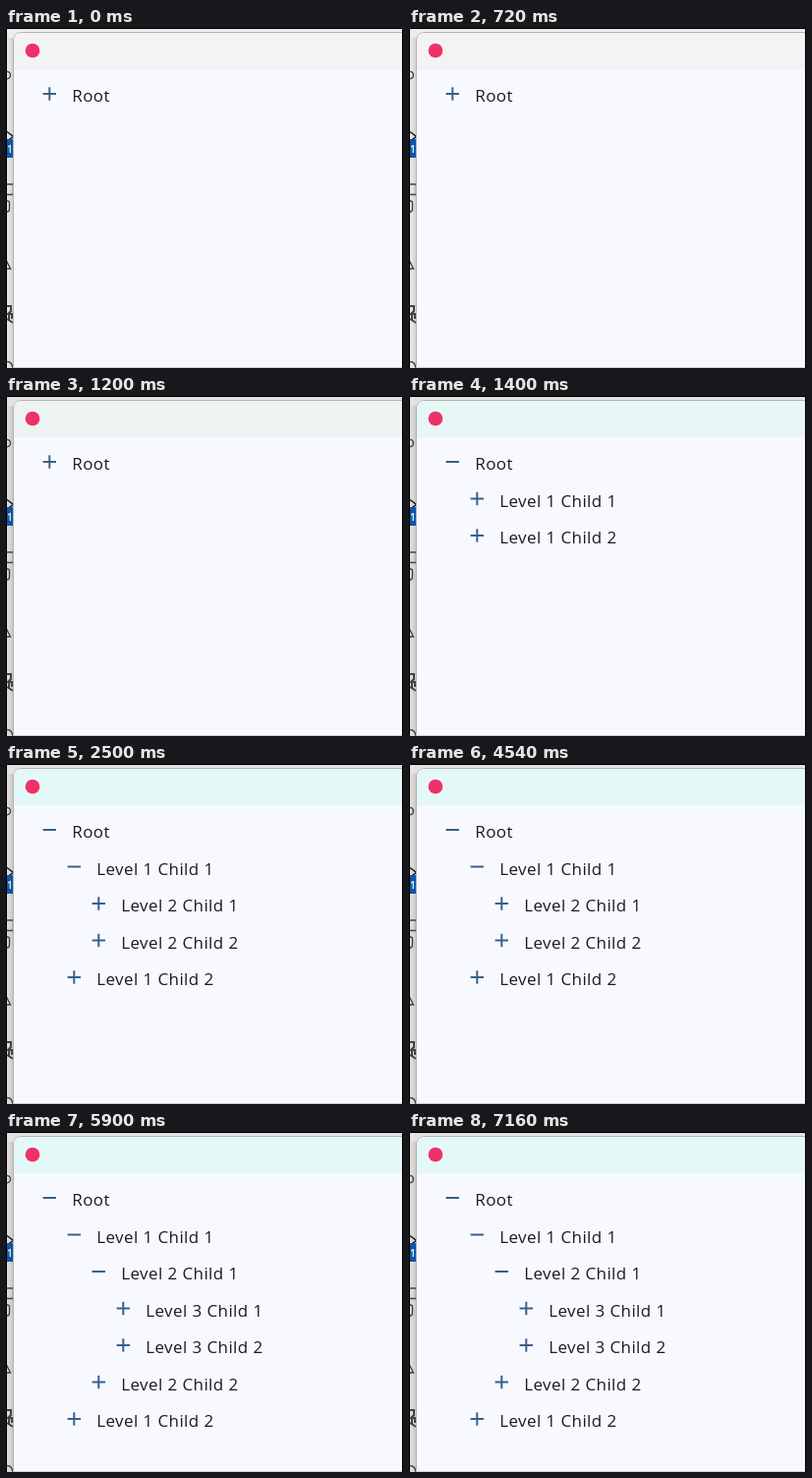
An HTML page that plays this animation: 404 px wide and 346 px high, repeating every 8000 ms.

```html
<!DOCTYPE html>
<html lang="en">
<head>
<meta charset="utf-8">
<title>Tree view</title>
<style>
  html, body { margin: 0; width: 100%; height: 100%; overflow: hidden; }
  svg { display: block; width: 404px; height: 346px; }
  .label { font: 400 17px "Open Sans", "Noto Sans", sans-serif; letter-spacing: .4px; fill: #191c20; }
  .icon { stroke: #36618e; stroke-width: 2; fill: none; }
  .badge { font: 600 10px "Open Sans", sans-serif; fill: #fff; }
  .behind { fill: none; stroke: #454341; stroke-width: 1.4; }
</style>
</head>
<body>
<svg viewBox="0 0 404 346">
  <defs>
    <linearGradient id="shade">
      <stop offset="0" stop-color="#000" stop-opacity="0"/>
      <stop offset="1" stop-color="#000" stop-opacity=".14"/>
    </linearGradient>
  </defs>
  <rect id="desk" width="404" height="346"/>
  <rect x="1" y="10" width="7" height="336" fill="url(#shade)"/>

  <!-- slivers of the window behind -->
  <g class="behind">
    <path d="M0 44.5C6 43 6 53 0 51.5"/>
    <path d="M1 105.5L7.5 110.5L1 115" stroke="#111"/>
    <path d="M0 159H8M0 169.500H8M7.500 159V170"/>
    <path d="M0 176H1.500Q3.500 176 3.500 178V184Q3.500 187 1 187"/>
    <path d="M0 236L4.500 245H0"/>
    <path d="M1 283H5V288L2 291H6V296M1 296L7 300M3 291V298" stroke-width="2"/>
    <path d="M0 339.500Q6 339 7 346"/>
  </g>
  <rect x="1" y="113" width="7" height="19" fill="#0b58a8"/>
  <text class="badge" x="1" y="127">1</text>

  <path d="M7.500 346V13Q7.500 4.500 16 4.500H404V346Z" fill="#f8f9ff" stroke="#b4b3b2"/>
  <path id="bar" d="M8 42V13Q8 5 16 5H404V42Z"/>
  <circle cx="27" cy="23" r="7.300" fill="#ee3167"/>

  <g id="tree"></g>
  <path d="M0 .5H404M.5 0V346M403.500 0V346" stroke="#000"/>
</svg>
<script>
  const LOOP = 8000, ROW = 37.5, INDENT = 25;

  // open: time at which a node expands
  const root = {
    text: 'Root', open: 1400, kids: [
      { text: 'Level 1 Child 1', open: 2500, kids: [
        { text: 'Level 2 Child 1', open: 5900, kids: [
          { text: 'Level 3 Child 1' },
          { text: 'Level 3 Child 2' }
        ] },
        { text: 'Level 2 Child 2' }
      ] },
      { text: 'Level 1 Child 2' }
    ]
  };

  // time, title bar colour, desktop colour
  const tints = [
    [0, '#f3f3f3', '#efedec'],
    [1200, '#ecf3f2', '#e5e3e2'],
    [1400, '#e6f7f6', '#e5e3e2'],
    [2500, '#e4f8f7', '#e5e3e2']
  ];

  const byId = id => document.getElementById(id);
  const tree = byId('tree'), bar = byId('bar'), desk = byId('desk');

  function make(parent, tag, attrs) {
    const el = document.createElementNS('http://www.w3.org/2000/svg', tag);
    for (const key in attrs) el.setAttribute(key, attrs[key]);
    return parent.appendChild(el);
  }

  function build(node, depth) {
    const x = depth * INDENT;
    node.row = make(tree, 'g');
    make(node.row, 'path', { class: 'icon', d: `M${x + 37.6} 67h13.4` });
    node.stem = make(node.row, 'path', { class: 'icon', d: `M${x + 44.3} 60.3v13.4` });
    make(node.row, 'text', { class: 'label', x: x + 67.3, y: 75 }).textContent = node.text;
    (node.kids || []).forEach(kid => build(kid, depth + 1));
  }

  const show = (el, on) => el.setAttribute('display', on ? 'inline' : 'none');

  function layout(node, t, visible, index) {
    const open = t >= (node.open ?? Infinity);
    show(node.row, visible);
    show(node.stem, !open);
    node.row.setAttribute('transform', `translate(0 ${index * ROW})`);
    let next = index + (visible ? 1 : 0);
    for (const kid of node.kids || []) next = layout(kid, t, visible && open, next);
    return next;
  }

  function draw(t) {
    const [, barColor, deskColor] = tints.filter(step => step[0] <= t).pop();
    bar.setAttribute('fill', barColor);
    desk.setAttribute('fill', deskColor);
    layout(root, t, true, 0);
  }

  build(root, 0);
  const start = performance.now();
  function tick() {
    draw((performance.now() - start) % LOOP);
    requestAnimationFrame(tick);
  }
  tick();
</script>
</body>
</html>
```
